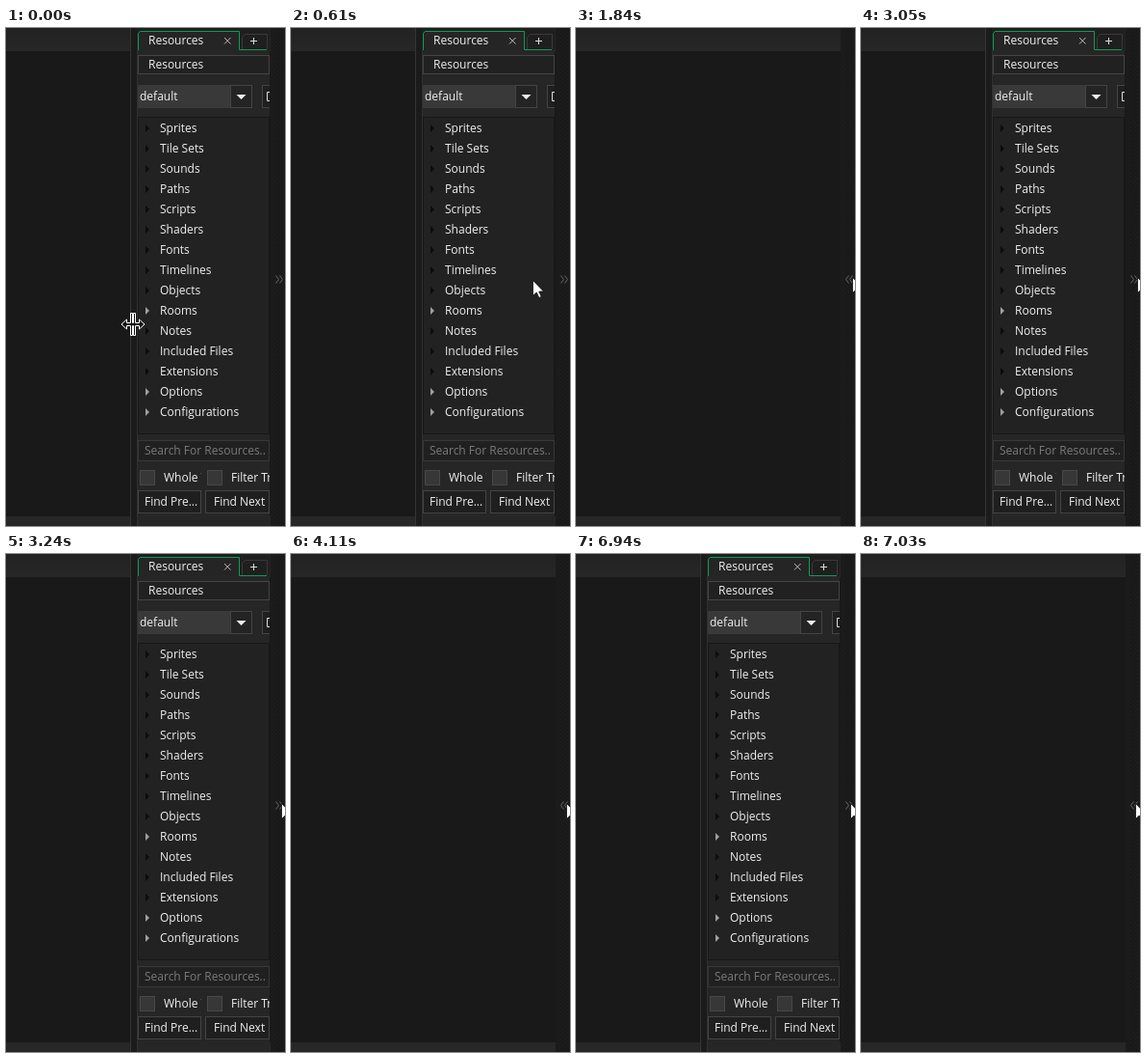
An HTML page that plays this animation: 290 px wide and 516 px high, repeating every 8000 ms.

```html
<!DOCTYPE html>
<html lang="en">
<head>
<meta charset="utf-8">
<title>Collapsing resource panel</title>
<style>
html, body { margin: 0; width: 100%; height: 100%; overflow: hidden; background: #191919; }
svg { display: block; width: 290px; height: 516px; }
text { font: 12px "Open Sans", "Noto Sans", sans-serif; fill: #f0f0f0; white-space: pre; }
.line { fill: none; stroke-width: 1; }
.field { fill: #212121; stroke: #454545; }
.button { fill: #1f1f1f; stroke: #444; }
.open { animation: open 8s step-end infinite; }
.closed { animation: closed 8s step-end infinite; }
.resize { animation: resize 8s step-end infinite; }
.arrow { animation: move 8s step-end infinite; }

@keyframes open {
  0%, 38.125%, 66.875% { visibility: visible; }
  23%, 51.375%, 87.875%, 100% { visibility: hidden; }
}
@keyframes closed {
  0%, 38.125%, 66.875% { visibility: hidden; }
  23%, 51.375%, 87.875%, 100% { visibility: visible; }
}
@keyframes resize {
  0% { visibility: visible; }
  1.125%, 100% { visibility: hidden; }
}
@keyframes move {
  0% { transform: translate(300px, 300px); }
  1.125% { transform: translate(142px, 299px); }
  2.125% { transform: translate(160px, 290px); }
  3% { transform: translate(181px, 281px); }
  4% { transform: translate(202px, 273px); }
  4.875% { transform: translate(221px, 267px); }
  5.875% { transform: translate(236px, 263px); }
  6.75% { transform: translate(246px, 261px); }
  7.625% { transform: translate(251px, 261px); }
  8.75% { transform: translate(259px, 261px); }
  9.875% { transform: translate(267px, 261px); }
  11% { transform: translate(274px, 261px); }
  12.125% { transform: translate(278px, 260px); }
  13.125% { transform: translate(281px, 259px); }
  14.125% { transform: translate(284px, 259px); }
  15.125% { transform: translate(285px, 258px); }
  16.125% { transform: translate(286px, 258px); }
  18.375% { transform: translate(287px, 258px); }
  40.5% { transform: translate(286px, 258px); }
  86.75%, 100% { transform: translate(285px, 258px); }
}
</style>
</head>
<body>
<svg viewBox="0 0 290 516">
  <defs>
    <linearGradient id="bar" x2="0" y2="1">
      <stop stop-color="#222"/><stop offset="1" stop-color="#272727"/>
    </linearGradient>
    <pattern id="dots" width="4" height="4" patternUnits="userSpaceOnUse">
      <path d="M0 0h1v1h-1zM2 2h1v1h-1z" fill="#131313"/>
    </pattern>
    <clipPath id="panel"><path d="M129 0H274V516H129z"/></clipPath>
    <clipPath id="whole"><path d="M160 455H203V477H160z"/></clipPath>
    <clipPath id="search"><path d="M138 428H271V449H138z"/></clipPath>
  </defs>

  <!-- workspace -->
  <path d="M0 0H290V516H0z" fill="#191919"/>
  <path d="M0 0H275V24H0z" fill="url(#bar)"/>
  <path d="M0 506H275V516H0z" fill="#272727"/>
  <path d="M275 0H290V516H275z" fill="#1b1b1b"/>
  <path d="M280 0H288V516H280z" fill="url(#dots)"/>

  <g class="closed">
    <path class="line" d="M283.5 256.500l-3 4 3 4M287.500 256.500l-3 4 3 4" stroke="#686868"/>
  </g>

  <g class="open">
    <g clip-path="url(#panel)">
      <path d="M129 0H275V516H129z" fill="#1b1b1b"/>
      <path d="M129 0h1V516h-1z" fill="#343434"/>
      <path d="M136 0H274V516H136z" fill="#1f1f1f"/>
      <path d="M136 23H274V516H136z" fill="#262626"/>
      <path class="line" d="M136.500 23V516" stroke="#303030"/>

      <!-- tabs -->
      <path d="M137 3H242V23H137z" fill="#252525"/>
      <path class="line" d="M245.500 22V9.500L248.500 6.500H271.500V22" stroke="#3a3a3a"/>
      <path class="line" d="M137.500 23V5.500L139.500 3.500H242.500V22.500H271" stroke="#0c9d5b"/>
      <text x="148" y="17">Resources</text>
      <path class="line" d="M227 10l6.500 6.500M233.500 10l-6.500 6.500" stroke="#bbb"/>
      <path class="line" d="M254 13.500h7M257.500 10v7" stroke="#ddd"/>

      <!-- header and filter -->
      <rect class="field" x="137.500" y="28.500" width="136" height="19"/>
      <text x="148" y="42">Resources</text>
      <path d="M137 59H256V83H137z" fill="#393939"/>
      <rect x="233.500" y="59.500" width="22" height="23" fill="#242424" stroke="#444"/>
      <path d="M239.500 69h10l-5 5z" fill="#eee"/>
      <text x="139" y="75">default</text>
      <rect class="button" x="266.500" y="59.500" width="20" height="23"/>
      <path class="line" d="M276 66.500H271.500V75.500H276" stroke="#ddd"/>

      <rect x="137.500" y="92.500" width="136" height="328" fill="#222" stroke="#171717"/>
      <g id="tree"></g>

      <!-- search -->
      <rect x="137.500" y="427.500" width="136" height="21" fill="#202020" stroke="#383838"/>
      <g clip-path="url(#search)"><text x="144" y="442" style="fill:#7b7b7b">Search For Resources...</text></g>
      <rect x="139.500" y="458.500" width="15" height="15" fill="#373737" stroke="#484848"/>
      <rect x="209.500" y="458.500" width="15" height="15" fill="#373737" stroke="#484848"/>
      <g clip-path="url(#whole)"><text x="164" y="470">Whole Word</text></g>
      <text x="234" y="470">Filter Tree</text>
      <rect class="button" x="137.500" y="479.500" width="65" height="23"/>
      <rect class="button" x="207.500" y="479.500" width="66" height="23"/>
      <text x="144" y="495">Find Pre...</text>
      <text x="216" y="495">Find Next</text>
    </g>
    <path class="line" d="M280.500 256.500l3 4-3 4M284.500 256.500l3 4-3 4" stroke="#686868"/>
  </g>

  <!-- pointers -->
  <path class="resize" d="M129.500 295.500h2v10h1v-10h2v10h4v-3.500l5.500 5-5.500 5v-3.500h-4v10h-2v-10h-1v10h-2v-10h-4v3.500l-5.500-5 5.500-5v3.500h4z" fill="#111" stroke="#fff"/>
  <path class="arrow" d="M.5.5V16.500L4.200 13 6.800 18.500 9.200 17.500 6.800 12H11.500z" fill="#fff" stroke="#111" stroke-width=".8"/>
</svg>
<script>
const names = ["Sprites", "Tile Sets", "Sounds", "Paths", "Scripts", "Shaders", "Fonts",
  "Timelines", "Objects", "Rooms", "Notes", "Included Files", "Extensions", "Options", "Configurations"];
const filled = ["Rooms", "Options", "Configurations"];
document.getElementById("tree").innerHTML = names.map((name, i) => {
  const y = 104 + 21 * i;
  const color = filled.includes(name) ? "#a0a0a0" : "#0c0c0c";
  return `<path d="M145 ${y - 4}l4 4-4 4z" fill="${color}"/><text x="160" y="${y + 4}">${name}</text>`;
}).join("");
</script>
</body>
</html>
```
